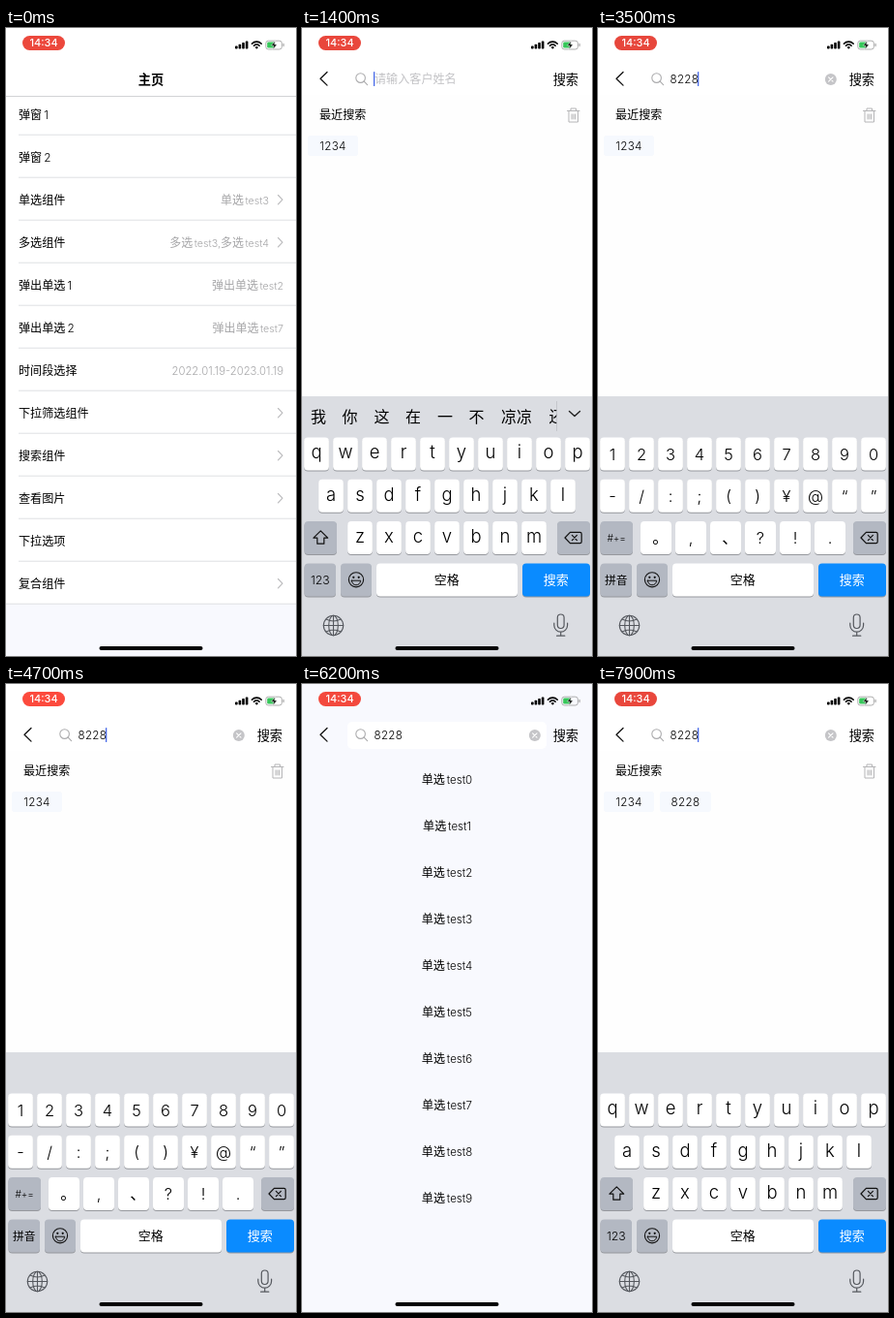
An HTML page for the animation above (8 s loop, 300 by 648 pixels).

```html
<!DOCTYPE html>
<html lang="zh-CN">
<head>
<meta charset="utf-8">
<title>搜索组件</title>
<style>
html, body { margin: 0; width: 100%; height: 100%; overflow: hidden; background: #fff; }
svg { display: block; width: 100vw; height: 100vh; }
text { font-family: Inter, "Noto Sans CJK SC", "Noto Sans CJK", sans-serif; font-weight: 350; white-space: pre; }
.bold { font-weight: 600; }
.digits { letter-spacing: .3px; }
.line { fill: none; stroke-linecap: round; stroke-linejoin: round; }

.home, .search, .letters, .numbers, .before, .after, .chip { animation: 8s step-end infinite; }
.home { animation-name: home; }
.search { animation-name: search; }
.letters { animation-name: letters; }
.numbers { animation-name: numbers; }
.before { animation-name: before; }
.after { animation-name: after; }
.chip { animation-name: chip; }
.typed { animation: typed 8s step-end infinite; }
.caret { animation: caret 8s linear infinite; }
.pill { animation: pill 2s ease-in-out -.35s infinite; }
.keyboard { animation: keyboard 8s cubic-bezier(.2, .5, .1, 1) infinite; }

@keyframes home { 0% { opacity: 1 } 11%, 100% { opacity: 0 } }
@keyframes search { 0% { opacity: 1 } 59.6% { opacity: 0 } 82.9%, 100% { opacity: 1 } }
@keyframes letters { 0% { opacity: 1 } 35.2% { opacity: 0 } 72%, 100% { opacity: 1 } }
@keyframes numbers { 0% { opacity: 0 } 35.2% { opacity: 1 } 72%, 100% { opacity: 0 } }
@keyframes before { 0% { opacity: 1 } 37.5%, 100% { opacity: 0 } }
@keyframes after { 0% { opacity: 0 } 37.5%, 100% { opacity: 1 } }
@keyframes chip { 0% { opacity: 0 } 70%, 100% { opacity: 1 } }
@keyframes typed {
  0% { transform: none }
  37.5% { transform: translateX(7px) }
  39.5% { transform: translateX(14px) }
  41.2% { transform: translateX(21px) }
  43%, 100% { transform: translateX(29px) }
}
@keyframes caret {
  0%, 18.1% { opacity: 1 } 20%, 21.9% { opacity: 0 }
  23.75%, 30.6% { opacity: 1 } 32.5%, 34.4% { opacity: 0 }
  36.25%, 49.4% { opacity: 1 } 51.25%, 53.1% { opacity: 0 }
  55%, 59.6% { opacity: 1 } 59.61%, 82.9% { opacity: 0 }
  82.91%, 90% { opacity: 1 } 91.9%, 93.75% { opacity: 0 }
  96.2%, 100% { opacity: 1 }
}
@keyframes keyboard {
  0%, 11.44% { transform: translateY(268px) }
  17.06%, 59.6% { transform: translateY(0) }
  65.22%, 82.9% { transform: translateY(268px) }
  88.52%, 100% { transform: translateY(0) }
}
@keyframes pill { 0%, 100% { fill: #e6473c } 50% { fill: #fc4a3d } }
</style>
</head>
<body>
<script>
const range = n => [...Array(n).keys()];
const rect = (x, y, w, h, fill, r = 0, more = '') =>
  `<rect x="${x}" y="${y}" width="${w}" height="${h}" rx="${r}" fill="${fill}" ${more}/>`;
const line = (d, color = '#000', w = 1, more = '') =>
  `<path class="line" d="${d}" stroke="${color}" stroke-width="${w}" ${more}/>`;
const group = (cls, ...parts) => `<g class="${cls}">${parts.join('')}</g>`;
const text = (x, y, s, size = 12.1, anchor = 'start', fill = '#000', more = '') =>
  `<text x="${x}" y="${y}" font-size="${size}" text-anchor="${anchor}" fill="${fill}" ${more}>${s}</text>`;
// Latin runs get their own size and a small gap after the Chinese
const mixed = (s, size = 10.7, gap = 1.4) => s.replace(/[!-~]+/g, (m, i) =>
  `<tspan font-size="${size}" dx="${i ? gap : 0}">${m}</tspan>`);

function statusBar() {
  const bars = range(4).map(i => rect(237 + i * 3.6, 18.5 - i * 1.7, 2.6, 3 + i * 1.7, '#000', .7));
  return rect(17, 8, 44, 15, '#e6473c', 7.5, 'class="pill"') +
    text(39, 19.4, '14:34', 11, 'middle', '#fff', 'style="font-weight:500"') +
    bars.join('') +
    line('M254.4 16.2a6.8 6.8 0 0 1 9.8 0M256.5 18.3a4 4 0 0 1 5.6 0', '#000', 1.6) +
    '<path d="M257.6 19.9a2.4 2.4 0 0 1 3.4 0l-1.7 1.8z"/>' +
    '<rect x="268.8" y="13.2" width="16.6" height="8.8" rx="2.6" fill="none" stroke="#a5a5a5" stroke-width=".9"/>' +
    rect(270.2, 14.6, 8, 6, '#35c759', 1.3) +
    rect(286.5, 16, 1.2, 3.2, '#a5a5a5', .6) +
    '<path d="M278.6 13l-4.2 5.2h2.6l-1 4.1 4.3-5.4h-2.7z" stroke="#fff" stroke-width=".5"/>';
}

function homePage() {
  const rows = [
    ['弹窗1'], ['弹窗2'], ['单选组件', '单选test3', 1], ['多选组件', '多选test3,多选test4', 1],
    ['弹出单选1', '弹出单选test2'], ['弹出单选2', '弹出单选test7'],
    ['时间段选择', '2022.01.19-2023.01.19'], ['下拉筛选组件', '', 1], ['搜索组件', '', 1],
    ['查看图片', '', 1], ['下拉选项'], ['复合组件', '', 1]
  ];
  const cells = rows.map(([label, value = '', arrow], i) => {
    const y = 89.5 + 44 * i, last = i === rows.length - 1;
    const size = /^\d/.test(value) ? 11.3 : 10.7;
    return text(13, y + 4.3, mixed(label, 11.8, 2)) +
      text(arrow ? 272 : 287, y + 4.3, mixed(value, size), 12, 'end', '#a6a6a8') +
      (arrow ? line(`M281.5 ${y - 5}l4.5 4.7l-4.5 4.7`, '#b9b9bb', 1.1) : '') +
      rect(last ? 0 : 13, y + 20.2, 300, 1, '#dfe0e3');
  });
  return group('home',
    rect(0, 0, 300, 648, '#f8f9fe'), rect(0, 0, 300, 594, '#fff'),
    text(150, 57.5, '主页', 13.2, 'middle', '#000', 'class="bold"'),
    rect(0, 70, 300, 1, '#d2d3d6'), ...cells);
}

const resultPage = () =>
  rect(0, 0, 300, 648, '#f8f9fe') + rect(47, 39, 206, 28, '#fff', 5) +
  range(10).map(i => text(150, 102.5 + 48 * i, mixed('单选test' + i, 11.5, 1.8), 12.1, 'middle')).join('');

const chip = (x, w, s) => rect(x, 111, w, 21, '#f6f9fe', 3) +
  text(x + w / 2, 125.8, s, 11.7, 'middle', '#000', 'class="digits"');

const searchPage = () => group('search',
  rect(0, 0, 300, 648, '#fff'), rect(0, 69, 300, 579, '#fefefe'),
  text(18, 94.3, '最近搜索'),
  line('M274.5 85.5h12.5M278 85v-2h5.5v2M276 86v11h9.5v-11M279 89v5M280.8 89v5M282.6 89v5', '#b5b5b7', 1),
  chip(6, 52, '1234'), group('chip', chip(64, 53, '8228')));

const searchBar = () =>
  line('M26 45.5l-7 6.8l7 6.8', '#111', 1.3) +
  '<circle cx="60.6" cy="51.6" r="4.8" fill="none" stroke="#acacae" stroke-width="1.1"/>' +
  line('M64.2 55.2l3.4 3.4', '#acacae', 1.2) +
  group('before', text(75, 57.3, '请输入客户姓名', 12.1, 'start', '#c2c2c5')) +
  '<clipPath id="clip"><rect class="typed" x="-25" y="40" width="100" height="26"/></clipPath>' +
  text(74.5, 57, '8228', 11.6, 'start', '#000', 'class="digits" clip-path="url(#clip)"') +
  group('caret', rect(74, 45, 1.3, 15, '#4668e8', .6, 'class="typed"')) +
  group('after', '<circle cx="240.8" cy="53" r="6" fill="#c5c5c8"/>',
    line('M238.6 50.8l4.4 4.4M243 50.8l-4.4 4.4', '#fff', 1.1)) +
  text(286, 57.6, '搜索', 13.2, 'end');

const GREY = '#b3b8c2';
const key = (x, y, w, fill = '#fff') => rect(x, y + 1, w, 34, '#96989d', 4) + rect(x, y, w, 34, fill, 4);
const cap = (x, y, w, s, size, dy = 0, dx = 0) =>
  key(x, y, w) + text(x + w / 2 + dx, y + 23.3 + dy, s, size, 'middle');

const letterRow = (s, x, y) =>
  [...s].map((c, i) => cap(x + 30 * i - 12.9, y, 25.8, c, 18.5, -1.5)).join('');
const signRow = (s, y) =>
  [...s].map((c, i) => cap(2.1 + 30 * i, y, 25.8, c, 16.5)).join('');

function keyboard() {
  const words = [[17, '我'], [49.5, '你'], [82.5, '这'], [115, '在'], [148, '一'], [180.5, '不'], [222, '凉凉'], [263.5, '还']];
  const marks = [['。', 4.5], [',', 0], ['、', 4.5], ['?', 0], ['!', 0], ['.', 0]];
  return group('keyboard',
    rect(0, 380, 300, 268, '#dbdde2'),
    group('before',
      ...words.map(([x, s]) => text(x, 407.3, s, 16, 'middle')),
      rect(264, 382, 36, 38, '#dbdde2'), rect(263.2, 385, .8, 31, '#bfc1c7'),
      line('M276.5 395.5l5.5 5l5.5-5', '#222', 1.4)),
    key(2.5, 509, 33.5, GREY), key(2.5, 552.5, 32.5, GREY),
    group('letters',
      letterRow('qwertyuiop', 15, 422.5), letterRow('asdfghjkl', 30, 465.7), letterRow('zxcvbnm', 60, 509),
      line('M19.3 518.8l7.4 7.4h-3.9v6h-7v-6h-3.9z', '#111', 1.2),
      text(18.8, 573.6, '123', 12.2, 'middle')),
    group('numbers',
      signRow('1234567890', 422.5), signRow('-/:;()¥@“”', 465.7),
      ...marks.map(([c, dx], i) => cap(44 + 36 * i, 509, 32, c, 16.5, 0, dx)),
      text(19.2, 529.8, '#+=', 10, 'middle'),
      text(18.8, 573.6, '拼音', 11.7, 'middle')),
    key(264, 509, 34, GREY),
    line('M277.4 520.3h10.2q1.6 0 1.6 1.6v8.2q0 1.6-1.6 1.6h-10.2l-5.4-5.7z', '#111', 1.2),
    line('M279.4 523.4l5 5.2M284.4 523.4l-5 5.2', '#111', 1.2),
    key(40, 552.5, 32, GREY),
    '<circle cx="56" cy="569.3" r="7.6" fill="none" stroke="#111" stroke-width="1.1"/>',
    '<circle cx="53.3" cy="566.8" r="1.1"/><circle cx="58.7" cy="566.8" r="1.1"/>',
    line('M51.3 570.2h9.4q-.9 4.6-4.7 4.6t-4.7-4.6z', '#111', 1),
    key(77, 552.5, 146), text(149.8, 574, '空格', 13, 'middle'),
    key(228, 552.5, 70, '#0a8bff'), text(262.8, 574, '搜索', 13, 'middle', '#fff'),
    '<g fill="none" stroke="#55585e" stroke-width="1.1"><circle cx="32.5" cy="616.5" r="10.2"/><ellipse cx="32.5" cy="616.5" rx="4.8" ry="10.2"/></g>',
    line('M32.5 606.3v20.4M22.3 616.5h20.4M25 610q7.5 4 15 0M25 623q7.5-4 15 0', '#55585e', 1.1),
    '<rect x="264.3" y="605" width="6.8" height="14.5" rx="3.4" fill="none" stroke="#55585e" stroke-width="1.2"/>',
    line('M260.8 614v2.2a6.9 6.9 0 0 0 13.8 0v-2.2M267.7 623.2v4M263.6 627.2h8.2', '#55585e', 1.2));
}

document.body.innerHTML = `<svg viewBox="0 0 300 648">${[
  resultPage(), searchPage(), searchBar(), keyboard(), homePage(), statusBar(),
  rect(96.5, 638, 107, 4, '#000', 2)
].join('')}</svg>`;
</script>
</body>
</html>
```
